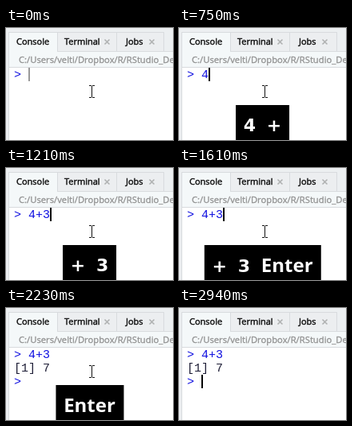
Write an HTML page that moves like this. It is 209 px wide and 141 px high and loops after 3110 ms.

```html
<!DOCTYPE html>
<html lang="en">
<head>
<meta charset="utf-8">
<title>Console typing</title>
<style>
  html, body { margin: 0; width: 100%; height: 100%; overflow: hidden; background: #fff; }
  .stage { position: relative; width: 209px; height: 141px; max-height: 100%; overflow: hidden; contain: strict; }
  svg { position: absolute; left: 0; top: 0; }
  .ui { font: 11px "Open Sans", "Noto Sans", sans-serif; }
  .tab { fill: #111; stroke: #111; stroke-width: .45; }
  .path { font-size: 11.25px; fill: #909090; stroke: #909090; stroke-width: .3; }
  .close { fill: none; stroke: #b0b2b2; stroke-width: 1.6; }
  .code { font: 15px "Liberation Mono", monospace; white-space: pre; }
  .input { fill: #1010e0; }
  .keys {
    position: absolute; left: 104.5px; top: 97px; height: 44px; padding: 0 10.2px;
    display: flex; gap: 13.8px; align-items: baseline; transform: translateX(-50%);
    overflow: hidden; background: #000; color: #fff; white-space: nowrap;
    font: bold 22px/52.8px "DejaVu Sans", sans-serif;
  }
  .keys .word { font: bold 24px/49.4px "Open Sans", sans-serif; }
</style>
</head>
<body>
<div class="stage">
  <svg width="209" height="141" viewBox="0 0 209 141">
    <rect width="209" height="141" fill="#eceff1"/>
    <rect x="4" y="30" width="205" height="19" fill="#f4f8f9"/>
    <rect x="4" y="49" width="205" height="92" fill="#fff"/>
    <g stroke="#d8dbde" fill="#eceef0" shape-rendering="crispEdges">
      <path d="M64.5 29.5V5.5H138.5V29.5"/>
      <path d="M138.5 29.5V5.5H197.5V29.5"/>
      <path d="M64 29.5H209M4 49.5H209" fill="none"/>
      <path d="M3.5 141V5.5H64.5V29.5" fill="none"/>
    </g>
    <rect x="4" y="6" width="60" height="25" fill="#f4f8f9"/>
    <g class="ui">
      <text class="tab" x="13" y="21">Console</text>
      <text class="tab" x="73" y="21">Terminal</text>
      <text class="tab" x="150" y="21">Jobs</text>
      <text class="path" x="16" y="44">C:/Users/velti/Dropbox/R/RStudio_Demo</text>
    </g>
    <path class="close" d="M123.5 14.5l6 6m0-6l-6 6M179.5 14.5l6 6m0-6l-6 6"/>

    <g class="code">
      <text class="input" x="10" y="63">&gt; <tspan data-from="350">4</tspan><tspan data-from="830">+</tspan><tspan data-from="1210">3</tspan></text>
      <g data-from="1680">
        <text x="10" y="80" fill="#202038">[1] 7</text>
        <text class="input" x="10" y="97">&gt;</text>
      </g>
    </g>
    <rect id="caret" width="2" height="17"/>
  </svg>

  <div class="keys" data-from="300" data-to="2560">
    <span data-to="1210">4</span>
    <span data-from="750" data-to="1680">+</span>
    <span data-from="1130" data-to="2080">3</span>
    <span class="word" data-from="1610">Enter</span>
  </div>

  <svg width="209" height="141" viewBox="0 0 209 141">
    <path id="pointer" d="M104 72.5h3m1 0h3M107.5 73v14M104 87.5h3m1 0h3" fill="none" stroke="#111"/>
  </svg>
</div>

<script>
  const LOOP = 3110;
  const timed = [...document.querySelectorAll('[data-from], [data-to]')];
  const caret = document.getElementById('caret');
  const pointer = document.getElementById('pointer');

  // time, x, y, opacity
  const caretStops = [
    [0, 28, 50, .4], [50, 28, 50, 0], [350, 37, 50, 1], [830, 46, 50, 1],
    [1210, 55, 50, 1], [1680, 28, 84, 1], [2230, 28, 84, 0], [2760, 28, 84, 1]
  ];

  function draw(t) {
    for (const el of timed) {
      const { from = 0, to = LOOP } = el.dataset;
      el.style.display = t >= +from && t < +to ? '' : 'none';
    }
    const [, x, y, opacity] = caretStops.findLast(stop => t >= stop[0]);
    caret.setAttribute('x', x);
    caret.setAttribute('y', y);
    caret.setAttribute('opacity', opacity);

    const step = Math.min(5, Math.max(0, Math.floor((t - 2560) / 76)));
    pointer.setAttribute('transform', `translate(0 ${step * step * 2.8})`);
  }

  const start = performance.now();
  function tick() {
    draw((performance.now() - start) % LOOP);
    requestAnimationFrame(tick);
  }
  tick();
</script>
</body>
</html>
```
